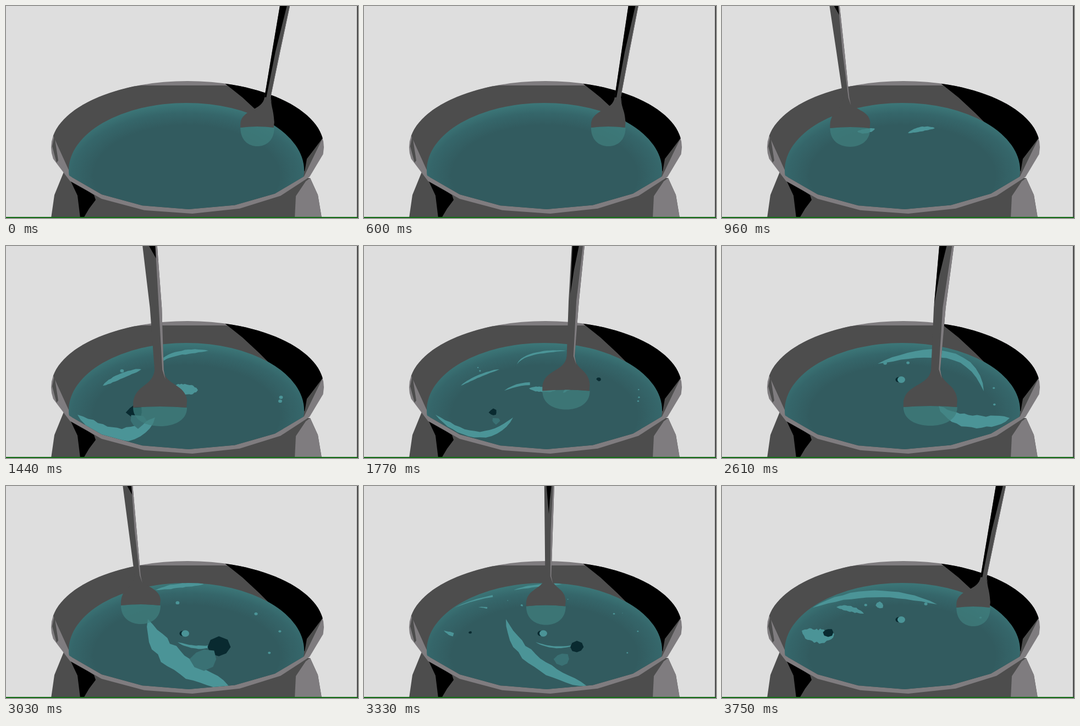
An HTML page that plays this animation: 640 by 387 pixels, repeating every 3780 ms.

```html
<!DOCTYPE html>
<html>
<head>
<meta charset="utf-8">
<title>Stirring pot</title>
<style>
html, body { margin: 0; width: 100%; height: 100%; overflow: hidden; background: #dedede; }
svg { display: block; width: 100vw; height: 100vh; }
</style>
</head>
<body>
<svg viewBox="0 0 640 387" preserveAspectRatio="none">
  <defs>
    <radialGradient id="teal" gradientUnits="userSpaceOnUse" cx="0" cy="0" r="1"
      gradientTransform="translate(328 310) scale(255 140)">
      <stop offset=".66" stop-color="#325b5f"/>
      <stop offset=".82" stop-color="#35666a"/>
      <stop offset=".97" stop-color="#3d7a7b"/>
    </radialGradient>
    <clipPath id="mouth"><path id="mouthPath"/></clipPath>
    <clipPath id="pool"><ellipse cx="328" cy="300" rx="214" ry="123"/></clipPath>
  </defs>
  <rect width="640" height="387" fill="#dedede"/>

  <path fill="#4d4d4d" d="M105,303 L88,345 82,387 574,387 567,345 553,314Z"/>
  <path d="M116,316 L130,346 135,387 141,387 151,370 163,354 160,345Z"/>
  <path fill="#7f7c7f" d="M553,314 L567,345 574,387 525,387 527,347 545,320Z"/>

  <path id="rim" fill="#7f7c7f"/>
  <path id="wall" fill="#4d4d4d"/>
  <path fill="#4d4d4d" d="M84,256 L88,237 95,282 92,286Z"/>
  <path id="dark"/>
  <g clip-path="url(#mouth)">
    <g clip-path="url(#pool)">
      <rect y="170" width="640" height="210" fill="url(#teal)"/>
      <g id="waves"></g>
      <path id="sunk" fill="#41807f" opacity=".72"/>
    </g>
  </g>
  <path id="spoon" fill="#4d4d4d"/>
  <path id="shade"/>
  <path id="shine" fill="#7f7c7f"/>
  <rect x="638" width="2" height="387" fill="#4a4a4a"/>
  <rect y="385" width="640" height="2" fill="#126a14"/>
</svg>
<script>
const LOOP = 3780;
const LIGHT = '#4b9497', MID = '#3a7174', DARK = '#092a30';
const $ = id => document.getElementById(id);
const mix = (a, b, k) => a + (b - a) * k;
const clamp = v => Math.max(0, Math.min(1, v));
const ease = v => { v = clamp(v); return v * v * (3 - 2 * v); };
const poly = pts => 'M' + pts.map(p => p[0].toFixed(1) + ',' + p[1].toFixed(1)).join(' ') + 'Z';
const draw = (id, d) => $(id).setAttribute('d', d);

let seed = 7;
function random() {
  seed = (seed * 16807) % 2147483647;
  return seed / 2147483647;
}

// Pot: arcs of two ellipses, in degrees clockwise from the right
function arc(rx, ry, from, to, step) {
  const pts = [];
  for (let a = from; a <= to; a += step) {
    const r = a * Math.PI / 180;
    pts.push([330 + rx * Math.cos(r), 258 + ry * Math.sin(r)]);
  }
  return pts;
}
const front = arc(240, 113, 28, 153, 20.5);
draw('rim', poly([...arc(248, 121, 6, 172, 20.5), ...arc(248, 121, 175, 364, 5)]));
draw('wall', poly([...front, ...arc(248, 121, 190, 352, 3).map(([x, y]) => [x, Math.max(y, 145)])]));
draw('mouthPath', poly([...front, [100, 300], [100, 150], [560, 150], [560, 300]]));
draw('dark', poly([[430, 167], ...arc(248, 121, 286, 352, 3), [560, 262], [547, 279], [543, 302], [490, 225], [460, 195]]));

// Stirring path: time, blade x, waterline y
const path = [
  [0, 457, 222], [540, 457, 222], [960, 233, 223], [1440, 280, 295], [2130, 440, 230],
  [2610, 379, 294], [3030, 245, 218], [3720, 457, 222], [LOOP, 457, 222]
];
const slope = (i, c) => (path[i + 1][c] - path[i][c]) / (path[i + 1][0] - path[i][0]);

// Slope that never overshoots its neighbours
function tangent(i, c) {
  if (i === 0 || i === path.length - 1) return 0;
  const a = slope(i - 1, c), b = slope(i, c);
  return a * b > 0 ? 2 * a * b / (a + b) : 0;
}

function bladeAt(t) {
  const i = Math.max(0, path.findIndex(p => p[0] > t) - 1);
  const p = path[i], q = path[i + 1], d = q[0] - p[0], u = (t - p[0]) / d;
  return [1, 2].map(c => {
    const m = tangent(i, c) * d, n = tangent(i + 1, c) * d, gap = q[c] - p[c];
    return p[c] + u * m + u * u * (3 * gap - 2 * m - n) + u * u * u * (m + n - 2 * gap);
  });
}

function drawSpoon(t) {
  const [cx, y] = bladeAt(t);
  const off = cx - 330, near = clamp((y - 220) / 74);
  const top = 335.7 + (1.345 + .142 * near) * off;
  const nx = cx + .115 * off + 4, ny = y - 55 - 14 * near;
  const half = (72 + 26 * near - .09 * Math.max(0, off) * (1 - near)) / 2;
  const tw = mix(9, 13.3, near), nw = mix(5.5, 8.3, near);
  const L = cx - half, R = cx + half, h = y - ny, low = y + 34;
  const edge = (f, k) => {
    const bend = -.05 * off * near * Math.sin(Math.PI * k);
    return `${mix(top, nx, k) + bend + (2 * f - 1) * mix(tw, nw, k)},${ny * k}`;
  };
  draw('spoon', `M${edge(0, 0)} L${edge(1, 0)} ${edge(1, .5)} ${edge(1, 1)}
    C${nx + nw + 2},${ny + h * .42} ${R - half * .06},${ny + h * .36} ${R},${y - h * .18} L${R - 1},${y}
    Q${cx},${y - 4} ${L},${y} L${L},${y - h * .13}
    C${L + half * .08},${ny + h * .38} ${nx - nw - 3},${ny + h * .45} ${edge(0, 1)} L${edge(0, .5)}Z`);
  draw('sunk', `M${L},${y} Q${cx},${y - 4} ${R},${y} C${R},${y + 24} ${cx + half * .5},${low} ${cx},${low}
    C${cx - half * .5},${low} ${L},${y + 24} ${L},${y}Z`);

  // Shadow slides from the right edge to the left as the handle leans over
  const k = clamp((top - 260) / 150), far = clamp((top - 410) / 60);
  const len = mix(mix(.13, .48, k), 1, far);
  draw('shade', `M${edge(.45 * (1 - k), 0)} L${edge(.95 - .45 * k + .2 * far, 0)}
    ${edge(mix(.95, .22, k) + .2 * far, len * .5)} ${edge(1 - k + .3 * far, len)} ${edge(1 - k, len)}Z`);
  const lit = mix(.25, .06, far);
  draw('shine', `M${edge(1 - lit * .5, 0)} L${edge(1, 0)} ${edge(1, .5)} ${edge(1, 1)}
    L${nx + nw + 3},${ny + h * .25} L${edge(1 - lit * .6, 1)} ${edge(1 - lit, .5)}Z`);
}

// Each splash: peak time, wakes [course, half width], chips [colour, x, y, size], number of drops
const splashes = [
  { peak: 960, drops: 0, wakes: [['M387,223 Q362,222 338,232', 4], ['M278,224 Q262,230 246,229', 4]], chips: [] },
  { peak: 1440, drops: 3, wakes: [
    ['M368,191 Q290,192 278,216', 4], ['M246,225 Q205,236 176,255', 5],
    ['M300,260 Q325,262 349,263', 10], ['M130,308 Q215,378 271,313', 12]
  ], chips: [[DARK, 235, 304, 18], [MID, 240, 319, 16]] },
  { peak: 2130, drops: 2, wakes: [['M255,264 Q315,232 376,281', 8], ['M362,268 Q385,245 418,252', 12]],
    chips: [[DARK, 427, 243, 12]] },
  { peak: 2610, drops: 4, wakes: [['M283,215 Q450,160 476,265', 7], ['M394,292 Q432,335 523,314', 12]], chips: [] },
  { peak: 3030, drops: 4, wakes: [
    ['M272,190 Q310,180 360,179', 4], ['M258,243 Q279,326 405,365', 19], ['M312,285 Q345,300 380,291', 3]
  ], chips: [[DARK, 387, 294, 23], [MID, 360, 316, 23]] },
  { peak: 3740, drops: 3, wakes: [
    ['M165,222 Q270,175 391,216', 6], ['M208,221 Q235,222 258,233', 5], ['M145,264 Q175,281 204,270', 13]
  ], chips: [[DARK, 193, 267, 10], [LIGHT, 287, 218, 8]] }
];

function add(tag, fill) {
  const el = document.createElementNS('http://www.w3.org/2000/svg', tag);
  el.setAttribute('fill', fill);
  return $('waves').appendChild(el);
}

function oval(el, x, y, r) {
  const size = { cx: x, cy: y, rx: r, ry: r * .85 };
  for (const k in size) el.setAttribute(k, Math.max(0, size[k]));
}

// Points along a course, with the normal and a slightly ragged, tapered width
function ribbon([course, width]) {
  const el = add('path', LIGHT);
  el.setAttribute('d', course);
  const len = el.getTotalLength(), pts = [];
  for (let i = 0; i <= 16; i++) {
    const u = i / 16, a = el.getPointAtLength(len * u);
    const p = el.getPointAtLength(len * u - 1), q = el.getPointAtLength(len * u + 1);
    const d = Math.hypot(q.x - p.x, q.y - p.y);
    const w = width * Math.pow(Math.sin(Math.PI * u), .6) * mix(.8, 1.15, random());
    pts.push([a.x, a.y, (p.y - q.y) / d * w, (q.x - p.x) / d * w]);
  }
  return { el, pts };
}

function chip([fill, x, y, size]) {
  const pts = [];
  for (let i = 0; i < 8; i++) {
    const a = i * Math.PI / 4, r = size * mix(.65, 1.15, random());
    pts.push([r * Math.cos(a), r * Math.sin(a) * .85]);
  }
  return { el: add('path', fill), x, y, pts };
}

function drop() {
  const a = random() * 2 * Math.PI;
  return { el: add('ellipse', LIGHT), x: 325 + 175 * Math.cos(a), y: 275 + 62 * Math.sin(a), r: mix(2, 3.5, random()) };
}

splashes.forEach((s, i) => {
  s.from = i ? splashes[i - 1].peak + 60 : 700;
  s.to = i < splashes.length - 1 ? splashes[i + 1].peak - 40 : LOOP + 500;
  s.wakes = s.wakes.map(ribbon);
  s.chips = s.chips.map(chip);
  s.drops = Array.from({ length: s.drops }, drop);
});
const bubbleShade = add('ellipse', DARK), bubble = add('ellipse', LIGHT);

// A wake is drawn out behind the spoon, then thins away
function drawSplash(s, t) {
  const grow = ease((t - s.from) / (s.peak - s.from));
  const size = grow * ease((s.to - t) / (s.to - s.peak));
  for (const { el, pts } of s.wakes) {
    const shown = pts.slice(0, 1 + Math.round(grow * 16));
    const side = n => shown.map(([x, y, dx, dy]) => [x + n * dx * size, y + n * dy * size]);
    el.setAttribute('d', size > .01 ? poly([...side(1), ...side(-1).reverse()]) : '');
  }
  for (const { el, x, y, pts } of s.chips) {
    el.setAttribute('d', poly(pts.map(p => [x + p[0] * size, y + p[1] * size])));
  }
  for (const { el, x, y, r } of s.drops) oval(el, x, y - 12 * (1 - grow), r * size);
}

function drawBubble(t) {
  const r = 7 * ease((t - 2250) / 300);
  const y = 244 + 30 * Math.sin(Math.PI * clamp((t - 2610) / 1140)) ** 2;
  oval(bubbleShade, 321, y, r * .8);
  oval(bubble, 326, y, r);
}

function frame(now) {
  const t = now % LOOP;
  drawSpoon(t);
  for (const s of splashes) drawSplash(s, t);
  drawBubble(t);
  requestAnimationFrame(frame);
}
frame(0);
</script>
</body>
</html>
```
